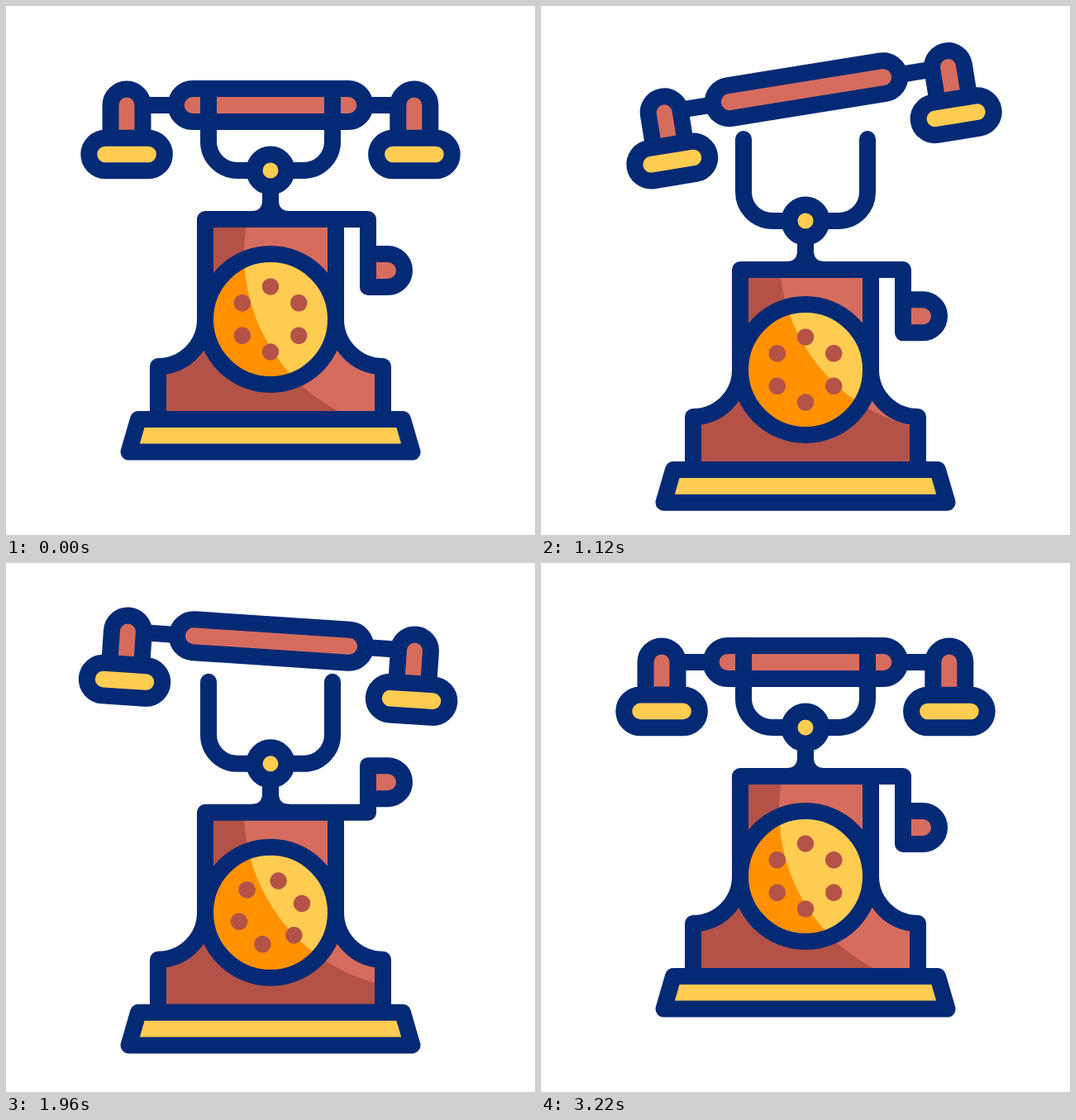
Recreate the animation shown at these times as an HTML page. Size 640 px wide and 640 px high, loop 3.6 s.

```html
<!DOCTYPE html>
<html lang="en">
<head>
<meta charset="utf-8">
<title>Ringing telephone</title>
<style>
  html, body { margin: 0; width: 100%; height: 100%; overflow: hidden; background: #fff; }
  svg { display: block; width: 100%; height: 100%; }
  .line { stroke: #042a75; stroke-width: 20; stroke-linejoin: round; stroke-linecap: round; fill: none; }
  .navy { fill: #042a75; }
  .red { fill: #d66c5e; }
  .dark { fill: #b45247; }
  .yellow { fill: #ffcc52; }
  .orange { fill: #ff9100; }
</style>
</head>
<body>
<svg viewBox="0 0 640 640">
  <defs>
    <path id="shell" d="M241 258V379a57 57 0 0 1-57 57V500H456V436a57 57 0 0 1-57-57V258Z"/>
    <circle id="disc" cx="320" cy="379" r="79"/>
    <!-- The light stays put on the stage while the phone moves through it. -->
    <clipPath id="light"><circle cx="504" cy="300" r="216"/></clipPath>
    <g id="earpiece">
      <path class="line red" d="M126.5 165V120a19.5 19.5 0 0 1 39 0V165"/>
      <rect class="line yellow" x="100.3" y="159.7" width="91.6" height="39.6" rx="19.8"/>
    </g>
  </defs>

  <g id="handset">
    <path class="line" d="M166 120H206M434 120H474"/>
    <use href="#earpiece"/>
    <use href="#earpiece" x="347.8"/>
    <rect class="line red" x="205.7" y="100" width="228.6" height="40" rx="20"/>
  </g>

  <g class="body"><use href="#shell" class="dark"/></g>
  <g clip-path="url(#light)"><g class="body"><use href="#shell" class="red"/></g></g>
  <g class="body">
    <use href="#shell" class="line"/>
    <use href="#disc" class="orange"/>
  </g>
  <g clip-path="url(#light)"><g class="body"><use href="#disc" class="yellow"/></g></g>

  <g class="body">
    <use href="#disc" class="line"/>
    <g id="dots" class="dark"></g>
    <path class="line yellow" d="M160 500H480L491.5 539.6H148.5Z"/>
    <path class="navy" d="M310 220V235q0 13-13 13v6h46v-6q-13 0-13-13V220Z"/>
    <path class="line" d="M245 100V164a35 35 0 0 0 35 35H360a35 35 0 0 0 35-35V100"/>
    <circle class="line yellow" cx="320" cy="199" r="19.5"/>
    <path id="arm" class="line"/>
    <path id="knob" class="line red" d="M438 -20H462a20 20 0 0 1 0 40H438Z"/>
  </g>
</svg>
<script>
const LOOP = 3600, HALF = 1620, DROP = 64;
const $ = id => document.getElementById(id);
const bodies = document.querySelectorAll('.body');

$('dots').innerHTML = Array.from({ length: 6 }, (_, i) =>
  `<circle cx="320" cy="339.5" r="10.3" transform="rotate(${i * 60} 320 379)"/>`).join('');

// Cubic bezier easing with control points (x1, 0) and (x2, 1).
function bezier(x1, x2) {
  return x => {
    let lo = 0, hi = 1;
    for (let i = 0; i < 24; i++) {
      const s = (lo + hi) / 2, r = 1 - s;
      if (3 * s * r * r * x1 + 3 * s * s * r * x2 + s ** 3 < x) lo = s; else hi = s;
    }
    return lo * lo * (3 - 2 * lo);
  };
}

// Monotone cubic curve through [time, value] points, at rest at each extreme.
function track(...points) {
  const slope = i => (points[i + 1][1] - points[i][1]) / (points[i + 1][0] - points[i][0]);
  const tangents = points.map((_, i) => {
    if (i === 0 || i === points.length - 1) return 0;
    const a = slope(i - 1), b = slope(i);
    return a * b > 0 ? 2 * a * b / (a + b) : 0;
  });
  return t => {
    const last = points.length - 1;
    if (t >= points[last][0]) return points[last][1];
    const i = points.findIndex(p => p[0] > t) - 1;
    const [t0, v0] = points[i], [t1, v1] = points[i + 1];
    const d = t1 - t0, u = (t - t0) / d, w = u * u * (3 - 2 * u);
    return v0 + (v1 - v0) * w
      + d * u * (1 - u) * (tangents[i] * (1 - u) - tangents[i + 1] * u);
  };
}

const dropEase = bezier(0.32, 0.067);
const tilt = track([0, 0], [380, -16.04], [540, -17.5], [800, -19], [1620, 10],
  [2430, -6.2], [3050, 0.7], [3240, 0]);
const lift = track([0, 0], [380, -10.5], [540, -11.5], [810, -14.8], [1120, -18.8],
  [1620, -22.5], [1960, -25.5], [2380, -27.5], [2660, -15.8], [3240, 0]);
const drift = track([0, 0], [600, 1], [2400, 1], [3240, 0]);
const crank = track([0, 62], [600, -58], [1200, 62], [1800, -58], [2400, 62]);
const spin = track([0, 0], [950, 360], [1191, 360], [2183, 720]);

function bodyDrop(t) {
  if (t < HALF) return DROP * dropEase(t / HALF);
  return DROP * (1 - dropEase(Math.min(1, t / HALF - 1)));
}

function draw(t) {
  const shift = `translate(0 ${bodyDrop(t)})`;
  bodies.forEach(body => body.setAttribute('transform', shift));
  $('handset').setAttribute('transform',
    `translate(${drift(t)} ${lift(t)}) rotate(${tilt(t)} 320 120)`);
  $('dots').setAttribute('transform', `rotate(${spin(t)} 320 379)`);
  const knobY = 258 + crank(t);
  $('arm').setAttribute('d', `M399 258H438V${knobY}`);
  $('knob').setAttribute('transform', `translate(0 ${knobY})`);
}

const start = performance.now();
function tick() {
  draw((performance.now() - start) % LOOP);
  requestAnimationFrame(tick);
}
draw(0);
requestAnimationFrame(tick);
</script>
</body>
</html>
```
